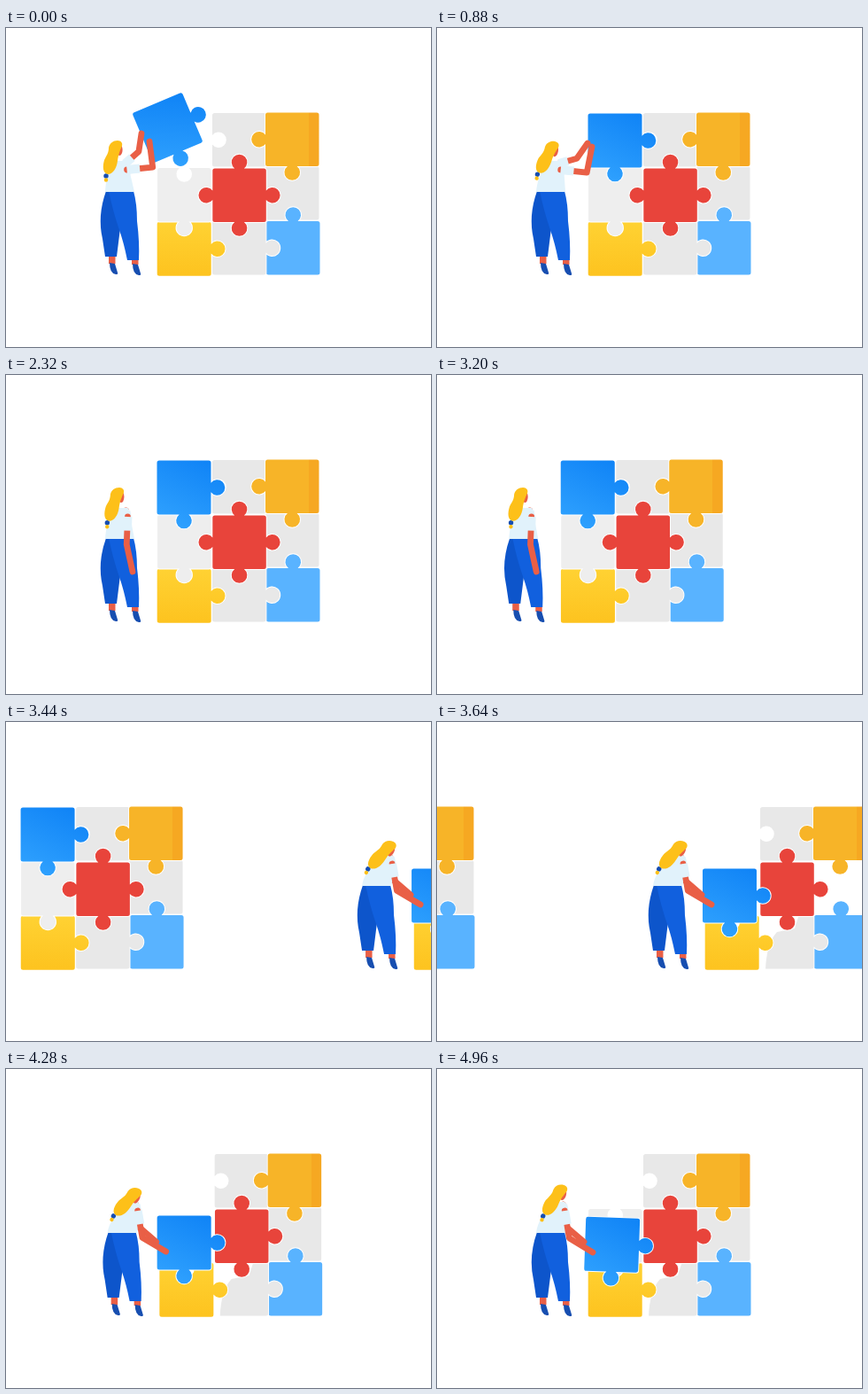
Recreate the animation shown at these times as an HTML page. Size 480 px wide and 360 px high, loop 5000 ms.

```html
<!DOCTYPE html>
<html lang="en">
<head>
<meta charset="utf-8">
<title>Puzzle</title>
<style>
html, body { margin: 0; width: 100%; height: 100%; overflow: hidden; background: #fff; }
svg { display: block; width: 100vw; height: 100vh; }
.piece { stroke: #fff; stroke-width: 1.8; paint-order: stroke; }
</style>
</head>
<body>
<svg id="stage" viewBox="0 0 480 360">
  <defs>
    <linearGradient id="blue" x1="0.8" y1="0" x2="0.3" y2="1">
      <stop offset="0" stop-color="#0f83f6"/><stop offset="1" stop-color="#2fa1fe"/>
    </linearGradient>
    <linearGradient id="yellow" x1="0" y1="0" x2="0" y2="1">
      <stop offset="0" stop-color="#ffd233"/><stop offset="1" stop-color="#fdc31f"/>
    </linearGradient>
    <linearGradient id="orange">
      <stop offset="0.85" stop-color="#f7b428"/><stop offset="0.85" stop-color="#f6a822"/>
    </linearGradient>
  </defs>
</svg>
<script>
const LOOP = 5000, SPACING = 444;
const SLIDE_START = 2880, SLIDE_END = 4440;
const SKIN = '#e95f46', CLOTH = '#e1f2fb', NAVY = '#174eb0', HAIR = '#fdc019', GRAY = '#e8e8e8';
const stage = document.getElementById('stage');

const span = (t, a, b) => Math.min(1, Math.max(0, (t - a) / (b - a)));
const ease = u => (1 - Math.cos(Math.PI * u)) / 2;
const mix = (a, b, u) => a + (b - a) * u;

// Timing curve with control points (x1, 0) and (x2, 1), solved by bisection.
function slideEase(u, x1 = 0.555, x2 = 0.2) {
  let lo = 0, hi = 1;
  for (let i = 0; i < 24; i++) {
    const s = (lo + hi) / 2, r = 1 - s;
    if (3 * x1 * s * r * r + 3 * x2 * s * s * r + s * s * s < u) lo = s;
    else hi = s;
  }
  return lo * lo * (3 - 2 * lo);
}

function set(el, attrs) {
  for (const k in attrs) el.setAttribute(k, attrs[k]);
}

function add(parent, tag, attrs = {}) {
  const el = document.createElementNS('http://www.w3.org/2000/svg', tag);
  set(el, attrs);
  parent.appendChild(el);
  return el;
}

// Jigsaw outline; sides run top, right, bottom, left: 1 knob, -1 notch, 0 flat.
function piecePath(x, y, size, sides) {
  const round = 2.5, neck = 5.3, r = 8.8, half = size / 2;
  let d = '';
  sides.forEach((side, i) => {
    const ux = [1, 0, -1, 0][i], uy = [0, 1, 0, -1][i];
    const mx = x + half + uy * half, my = y + half - ux * half;
    const at = (k, out = 0) => `${mx + ux * k - uy * out} ${my + uy * k + ux * out}`;
    d += `${i ? 'L' : 'M'}${at(round - half)}`;
    if (side) d += `L${at(-neck)}A${r} ${r} 0 1 ${side > 0 ? 1 : 0} ${at(neck)}`;
    d += `L${at(half - round)}Q${at(half)} ${at(half, round)}`;
  });
  return d + 'Z';
}

function piece(parent, x, y, sides, fill, size = 60.5) {
  return add(parent, 'path', { class: 'piece', d: piecePath(x, y, size, sides), fill });
}

function makeBoard(g, entering) {
  piece(g, 233, 96, [0, 0, 0, -1], GRAY);
  const right = piece(g, 293, 156, [0, 0, 0, 0], GRAY);
  piece(g, 294, 218, [1, 0, 0, 0], '#59b3ff');
  piece(g, 233, 218, [0, 1, 0, 0], GRAY);
  if (entering) {
    add(g, 'path', { d: 'M231 217H277L272 233L252 237Q240 250 239 280H231Z', fill: '#fff' });
  }
  piece(g, 170.7, 218.7, [-1, 1, 0, 0], 'url(#yellow)', 61);
  const left = piece(g, 171, 158, [-1, 0, 1, 0], '#eeeeee');
  piece(g, 293, 95.5, [0, 0, 1, 1], 'url(#orange)');
  piece(g, 233.3, 158.5, [1, 1, 1, entering ? 0 : 1], '#e8443b');
  return { left, right };
}

// head: crown x, y and tilt; far and near: hand x, y and elbow bend.
const poses = {
  lift: { head: [126, 128, 0], far: [153, 119, 7], near: [162, 128, 21] },
  push: { head: [133, 129, 10], far: [170, 130, 7], near: [175, 134, 20] },
  show: { head: [134, 129, 10], far: [180, 179, 21], near: [181, 179, 18] },
  stand: { head: [128, 128, 1], far: [142, 220, 4], near: [143, 222, 4] },
  carry: { head: [147, 136, 25], far: [167, 195, 9], near: [178, 206, 13] },
  heave: { head: [143, 132, 16], far: [166, 195, 9], near: [176, 207, 13] }
};

const placing = [
  [0, 'lift'], [740, 'push'], [1000, 'push'],
  [1700, 'show'], [1800, 'show'], [2320, 'stand']
];
const lifting = [[4660, 'carry'], [4960, 'heave']];

function poseAt(keys, t) {
  let i = 0;
  while (i < keys.length - 2 && t >= keys[i + 1][0]) i++;
  const [t0, from] = keys[i], [t1, to] = keys[i + 1];
  const u = ease(span(t, t0, t1)), out = {};
  for (const k in poses[from]) {
    out[k] = poses[from][k].map((v, j) => mix(v, poses[to][k][j], u));
  }
  return out;
}

function makeArm(g) {
  const line = (stroke, width, cap) => add(g, 'polyline', {
    fill: 'none', stroke, 'stroke-width': width,
    'stroke-linecap': cap, 'stroke-linejoin': 'round'
  });
  return { skin: line(SKIN, 6.8, 'round'), sleeve: line(CLOTH, 10, 'butt') };
}

function drawArm(arm, x, y, [hx, hy, bend]) {
  const dx = hx - x, dy = hy - y, len = Math.hypot(dx, dy);
  const ex = x + dx / 2 - dy / len * bend, ey = y + dy / 2 + dx / len * bend;
  set(arm.skin, { points: [x, y, ex, ey, hx, hy].join(' ') });
  set(arm.sleeve, { points: [x, y, mix(x, ex, 0.5), mix(y, ey, 0.5)].join(' ') });
}

function makeWoman(g) {
  for (const [x, y] of [[116, 256], [142, 257]]) {
    const foot = add(g, 'g', { transform: `translate(${x} ${y})` });
    add(foot, 'rect', { width: 7.5, height: 10, fill: SKIN });
    add(foot, 'path', { d: 'M1 9L7 10L10 20Q11 22 8 22Q1 21 1 9Z', fill: NAVY });
  }
  const far = makeArm(g);
  add(g, 'path', { d: 'M113 184Q103 212 109 238L112 258H125L129 226L138 184Z', fill: '#0d55cb' });
  add(g, 'path', { d: 'M116 184H144Q148 198 148 218Q151 242 150 262H137Q133 242 128 228Q121 208 116 184Z', fill: '#1160de' });
  const top = add(g, 'path', { fill: CLOTH });
  const near = makeArm(g);
  const head = add(g, 'g');
  add(head, 'ellipse', { cx: 2.2, cy: 9.5, rx: 3.4, ry: 6.5, fill: SKIN });
  add(head, 'circle', { cx: -13, cy: 39, r: 2.7, fill: NAVY });
  add(head, 'circle', { cx: -13, cy: 43.5, r: 2.2, fill: HAIR });
  add(head, 'path', {
    d: 'M0 -1C4 -1 6 2 5 5C3 10 1 14 0 22C-1 30 -5 37 -11 37C-17 36 -17 28 -15 21C-12 15 -10 13 -10 7C-9 2 -5 -1 0 -1Z',
    fill: HAIR
  });
  return { far, near, top, head };
}

function drawWoman(w, { head: [x, y, tilt], far, near }) {
  const chest = 131 + (x - 127) * 0.45;
  set(w.head, { transform: `translate(${x} ${y}) rotate(${tilt})` });
  set(w.top, {
    d: `M112 185C113 174 ${chest - 17} 160 ${chest - 6} 150H${chest + 6}Q${chest + 11} 155 ${chest + 10} 166L145 185Z`
  });
  drawArm(w.far, chest + 4, 153, far);
  drawArm(w.near, chest + 6, 160, near);
}

function makeScene(entering) {
  const root = add(stage, 'g');
  const board = makeBoard(root, entering);
  const block = piece(root, -30.5, -30.5, [0, 1, 1, 0], 'url(#blue)', 61);
  return { root, board, block, woman: makeWoman(root) };
}

const first = makeScene(false), second = makeScene(true);

function showScene(scene, visible, x) {
  set(scene.root, { display: visible ? 'inline' : 'none', transform: `translate(${x} 0)` });
}

function place(block, x, y, angle) {
  set(block, { transform: `translate(${x} ${y}) rotate(${angle})` });
}

function render(t) {
  const p = slideEase(span(t, SLIDE_START, SLIDE_END));
  showScene(first, t < SLIDE_END, -SPACING * p);
  showScene(second, t >= SLIDE_START, SPACING * (1 - p));

  const drop = ease(span(t, 0, 740));
  place(first.block, mix(182.5, 201, drop), mix(112.5, 127, drop), mix(-23, 0, drop));
  drawWoman(first.woman, poseAt(placing, t));

  const rise = span(t, 4660, 4960) ** 2;
  place(second.block, mix(198.5, 197.7, rise), mix(196, 198.3, rise), 2 * rise);
  set(second.board.right, { opacity: span(t, 3700, 4200) });
  set(second.board.left, { opacity: span(t, 4680, 4900) });
  drawWoman(second.woman, poseAt(lifting, t));
}

function tick() {
  render(performance.now() % LOOP);
  requestAnimationFrame(tick);
}
tick();
</script>
</body>
</html>
```
